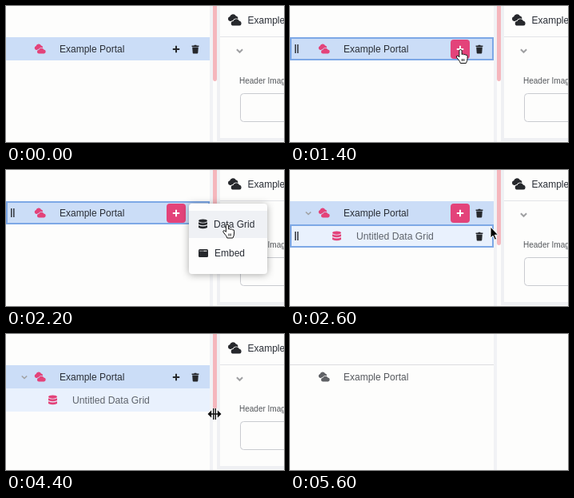
These frames come from a looping animation (348x170 px, 5.8 s). An HTML page:

```html
<!DOCTYPE html>
<html lang="en">
<head>
<meta charset="utf-8">
<title>Portal tree</title>
<style>
html, body { margin: 0; width: 100%; height: 100%; overflow: hidden; background: #fdfdfc; }
svg { display: block; width: 348px; height: 170px; }
text { font: 12px "Liberation Sans", Arial, sans-serif; fill: #2a2e36; white-space: pre; }
.gap { stroke: var(--bg); stroke-width: 1.6; paint-order: stroke; }
.chevron { fill: none; stroke: #a0a1a3; stroke-width: 1.6; }
.outline { fill: none; stroke: #7da8e6; stroke-width: 2; }
.pop { filter: drop-shadow(0 1px 5px #0005); }
</style>
</head>
<body>
<svg viewBox="0 0 348 170">
  <defs>
    <g id="clouds">
      <path d="M3 8a2.7 2.7 0 0 1-.4-5.3A3.8 3.8 0 0 1 9.6 2a2.5 2.5 0 0 1 1.6 4.2L9 8Z"/>
      <path class="gap" d="M6.8 13a2.6 2.6 0 0 1-.3-5.2A3.8 3.8 0 0 1 13.3 7.4a2.85 2.85 0 0 1 .3 5.6Z"/>
    </g>
    <g id="stack">
      <ellipse cx="5.5" cy="2.1" rx="5.5" ry="2.1"/>
      <path id="band" d="M0 3.7Q5.5 6.5 11 3.7V6.4Q5.5 9.2 0 6.4Z"/>
      <use href="#band" y="4"/>
    </g>
    <path id="trash" d="M0 .8H2.7L3.2 0H5.6L6.1 .8H8.8V2.1H0ZM.6 2.8H8.2L7.7 9.6Q7.6 10.6 6.7 10.6H2.1Q1.2 10.6 1.1 9.6Z"/>
    <path id="plus" d="M-4.2 0H4.2M0-4.2V4.2" stroke-width="2"/>
    <path id="grip" d="M6.8 0V11M9.8 0V11" stroke="#33363c" stroke-width="1.5"/>
  </defs>

  <rect width="348" height="170" fill="#fdfdfc"/>
  <rect x="255" width="4" height="170" fill="#f1f2f5"/>

  <g id="panel" style="--bg:#fdfdfc">
    <path d="M266 0V167H348" fill="none" stroke="#eff0f3" stroke-width="4"/>
    <path d="M268 38.5H348" stroke="#e3e4e7"/>
    <path d="M259 0H264V91Q264 94 261.5 94T259 91Z" fill="#f5b7bd"/>
    <use href="#clouds" transform="translate(277.3 10.3) scale(1.1)" fill="#26282c"/>
    <text x="302.5" y="22">Example</text>
    <path class="chevron" d="M288.9 54.2l3.6 3.6 3.6-3.6" style="stroke-width:2"/>
    <text x="292" y="97" style="font-size:10px;fill:#55585c">Header Image</text>
    <rect x="293.5" y="109.5" width="80" height="35" rx="4" fill="none" stroke="#c9cbd0"/>
  </g>

  <path id="rule" d="M0 38.5H255" stroke="#dcdde0"/>
  <g id="portal">
    <rect id="selected" y="39" width="255" height="29" fill="#cbddf7"/>
    <use id="icon" href="#clouds" transform="translate(35.2 47.6) scale(.92)"/>
    <text id="label" x="67" y="58">Example Portal</text>
    <g id="tools">
      <rect id="addButton" x="201" y="42" width="24" height="24" rx="4" fill="#e3437a"/>
      <use id="add" href="#plus" x="213" y="54"/>
      <use href="#trash" x="232.6" y="48.8" fill="#26282c"/>
    </g>
    <g id="portalHover">
      <rect class="outline" x="1" y="40" width="253" height="27"/>
      <use href="#grip" y="48"/>
    </g>
  </g>

  <g id="child">
    <path class="chevron" d="M19.8 52.5l3.2 3 3.2-3"/>
    <rect y="68" width="255" height="29" fill="#e9f1fd"/>
    <use href="#stack" x="53" y="76.5" fill="#e3437a"/>
    <text x="83" y="87" style="font-size:12.2px;fill:#5f646c">Untitled Data Grid</text>
    <g id="childHover">
      <rect class="outline" x="1" y="69" width="253" height="27"/>
      <use href="#grip" y="77"/>
      <rect id="delButton" x="225" y="71" width="24" height="24" rx="4" fill="#f2a2c0"/>
      <use id="del" href="#trash" x="232.6" y="77.8"/>
    </g>
  </g>

  <g id="menu">
    <rect class="pop" x="229" y="42" width="98" height="88" rx="4" fill="#fdfdfd"/>
    <rect id="menuHover" x="229" y="51" width="98" height="34" fill="#eff1f5"/>
    <use href="#stack" x="241" y="61.5" fill="#26282c"/>
    <text x="260" y="72">Data Grid</text>
    <rect x="241" y="99" width="12" height="10" rx="1.5" fill="#26282c"/>
    <path d="M242.5 101.2h1.2m1 0h1.2m1 0h4.6" stroke="#fdfdfd"/>
    <text x="261" y="108">Embed</text>
  </g>

  <g id="tip">
    <rect class="pop" x="212" y="99" width="50" height="35" rx="4" fill="#2b2c30"/>
    <text x="220" y="120" style="font-size:11.4px;font-weight:bold;fill:#fff">Delete</text>
  </g>

  <g id="cursor">
    <path id="arrow" d="M0 0V14l3.1-2.9 2.3 5.2 2.2-1-2.3-5.1H9.6Z" stroke="#fff"/>
    <path id="hand" d="M-1.6 1.6a1.6 1.6 0 0 1 3.2 0V6q1.4-1 2.6.3 1.5-.8 2.4.5 2-.4 2 1.4V11q0 3-1.7 6H-.2q-.4-2-1.8-3.5L-5 9.7q-.7-2 1.2-2 1 .2 2.2 1.7ZM2 11.5V14.5M4.2 11.5V14.5" fill="#fff" stroke="#111"/>
    <g id="resize">
      <path id="split" d="M-1.3-7V7M1.3-7V7M-6 0H6M-4.5-3L-7.5 0-4.5 3ZM4.5-3L7.5 0 4.5 3Z" stroke="#fff" stroke-width="3"/>
      <path d="M-1.3-7V7M1.3-7V7M-6 0H6M-4.5-3L-7.5 0-4.5 3ZM4.5-3L7.5 0 4.5 3Z" stroke="#111" stroke-width="1.4"/>
    </g>
  </g>
</svg>
<script>
const LOOP = 5800, STEP = 200;
const $ = id => document.getElementById(id);
const show = (id, on) => $(id).style.display = on ? "" : "none";

// Pointer path: time, x, y
const path = [
  [400, 180, 172], [800, 203, 88], [1000, 211, 49], [1200, 213.5, 54.5], [1800, 213.5, 54.5],
  [2200, 277, 68], [2400, 277, 68], [2600, 251, 71], [2800, 268, 92], [3400, 335, 172],
  [3800, 335, 172], [4400, 261, 100], [4600, 251, 88], [4800, 244.3, 82.3], [5400, 244.3, 82.3]
];

function pointerAt(t) {
  const i = Math.max(1, path.findIndex(p => p[0] >= t));
  const [t0, x0, y0] = path[i - 1], [t1, x1, y1] = path[i];
  const k = (t - t0) / (t1 - t0);
  return [x0 + (x1 - x0) * k, y0 + (y1 - y0) * k];
}

function draw(t) {
  const within = (from, to) => t >= from && t < to;
  const active = t < 5400;
  const adding = within(1200, 2800);
  const deleting = within(4800, 5400);

  show("panel", active);
  show("selected", active);
  show("tools", active);
  show("rule", !active);
  $("icon").style.fill = active ? "#e3437a" : "#606266";
  $("label").style.fill = active ? "" : "#55585d";
  $("portal").style.setProperty("--bg", active ? "#cbddf7" : "#fdfdfc");

  show("addButton", adding);
  $("add").style.stroke = adding ? "#fff" : "#26282c";
  show("portalHover", within(1200, 2600));
  show("menu", within(1600, 2600));
  show("menuHover", within(2200, 2600));

  show("child", within(2600, 5400));
  show("childHover", within(2600, 2800) || within(4600, 5400));
  show("delButton", deleting);
  $("del").style.fill = deleting ? "#b3164f" : "#26282c";
  show("tip", within(5000, 5400));

  const visible = within(400, 5400);
  const hand = within(1200, 2600) || deleting;
  const resize = within(4400, 4600);
  show("cursor", visible);
  show("hand", hand);
  show("resize", resize);
  show("arrow", !hand && !resize);
  if (visible) $("cursor").setAttribute("transform", `translate(${pointerAt(t)})`);
}

const start = performance.now();
function tick() {
  const t = (performance.now() - start) % LOOP;
  draw(Math.floor(t / STEP) * STEP);
  requestAnimationFrame(tick);
}
tick();
</script>
</body>
</html>
```
